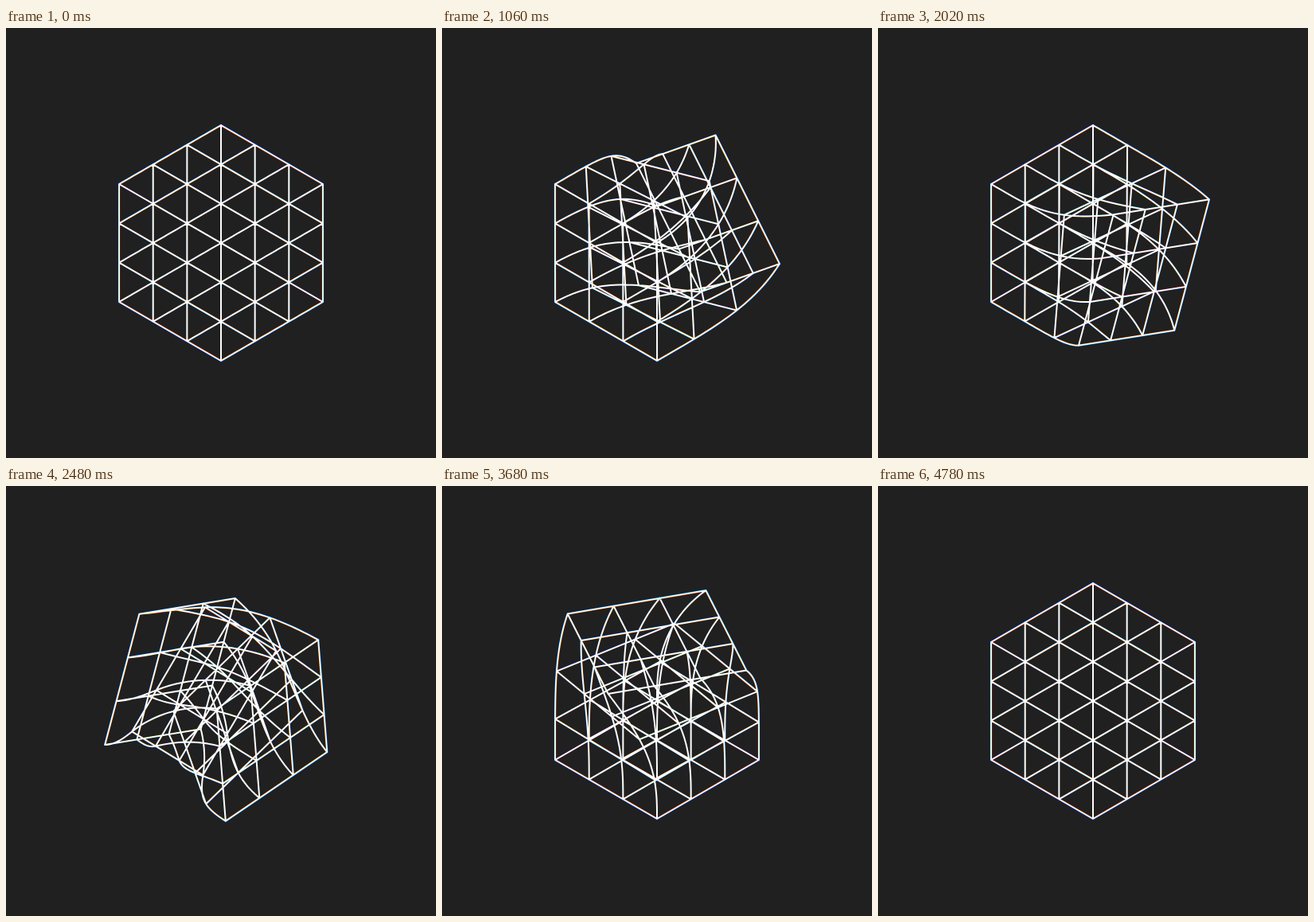
An HTML page with a canvas that plays this animation: 540 px wide and 540 px high, repeating every 4.8 s.

```html
<!DOCTYPE html>
<html lang="en">
<head>
<meta charset="utf-8">
<title>Twisting cube lattice</title>
<style>
  html, body { margin: 0; width: 100%; height: 100%; overflow: hidden; background: #202020; }
  canvas { display: block; width: 540px; height: 540px; }
</style>
</head>
<body>
<canvas id="stage" width="540" height="540"></canvas>
<script>
const ctx = document.getElementById('stage').getContext('2d');
const LOOP = 4800;
const TWIST = LOOP / 3;
const AXES = [1, 0, 2];            // twist axis of each third of the loop
const GRID = [-1, -1 / 3, 1 / 3, 1];
const STEPS = 36;
const HALF_W = 64, HALF_H = 37;    // projected half edge

// Slight lens fringe: each channel has its own scale.
const CHANNELS = [['#df0000', 0.9975], ['#00df00', 1], ['#0000df', 1.0025]];

function ease(t) {
  t = Math.min(1, Math.max(0, t));
  return t < 0.5 ? 0.5 * (2 * t) ** 2.5 : 1 - 0.5 * (2 - 2 * t) ** 2.5;
}

// The slice at p[axis] turns a quarter; slices with a higher coordinate lead.
function twist(p, axis, progress) {
  const b = (axis + 1) % 3, c = (axis + 2) % 3;
  const angle = Math.PI / 2 * ease(1.5 * progress - 0.25 + 0.2165 * p[axis]);
  const cos = Math.cos(angle), sin = Math.sin(angle);
  const q = [...p];
  q[b] = p[b] * cos - p[c] * sin;
  q[c] = p[b] * sin + p[c] * cos;
  return q;
}

const project = ([u, v, w]) => [HALF_W * (u - v), HALF_H * (u + v - 2 * w)];

function lattice(axis, progress) {
  const path = new Path2D();
  for (let dir = 0; dir < 3; dir++) {
    const steps = dir === axis ? STEPS : 1;   // only lines along the axis bend
    for (const m of GRID) for (const n of GRID) {
      for (let k = 0; k <= steps; k++) {
        const p = [];
        p[dir] = 2 * k / steps - 1;
        p[(dir + 1) % 3] = m;
        p[(dir + 2) % 3] = n;
        const [x, y] = project(twist(p, axis, progress));
        if (k) path.lineTo(x, y); else path.moveTo(x, y);
      }
    }
  }
  return path;
}

function draw(now) {
  const time = now % LOOP;
  const path = lattice(AXES[Math.floor(time / TWIST)], time % TWIST / TWIST);

  ctx.setTransform(1, 0, 0, 1, 0, 0);
  ctx.globalCompositeOperation = 'source-over';
  ctx.fillStyle = '#202020';
  ctx.fillRect(0, 0, 540, 540);

  ctx.globalCompositeOperation = 'lighter';
  ctx.lineWidth = 2;
  ctx.lineCap = ctx.lineJoin = 'round';
  for (const [color, scale] of CHANNELS) {
    ctx.setTransform(scale, 0, 0, scale, 270, 270);
    ctx.strokeStyle = color;
    ctx.stroke(path);
  }
}

const start = performance.now();
function frame() {
  draw(performance.now() - start);
  requestAnimationFrame(frame);
}
frame();
</script>
</body>
</html>
```
